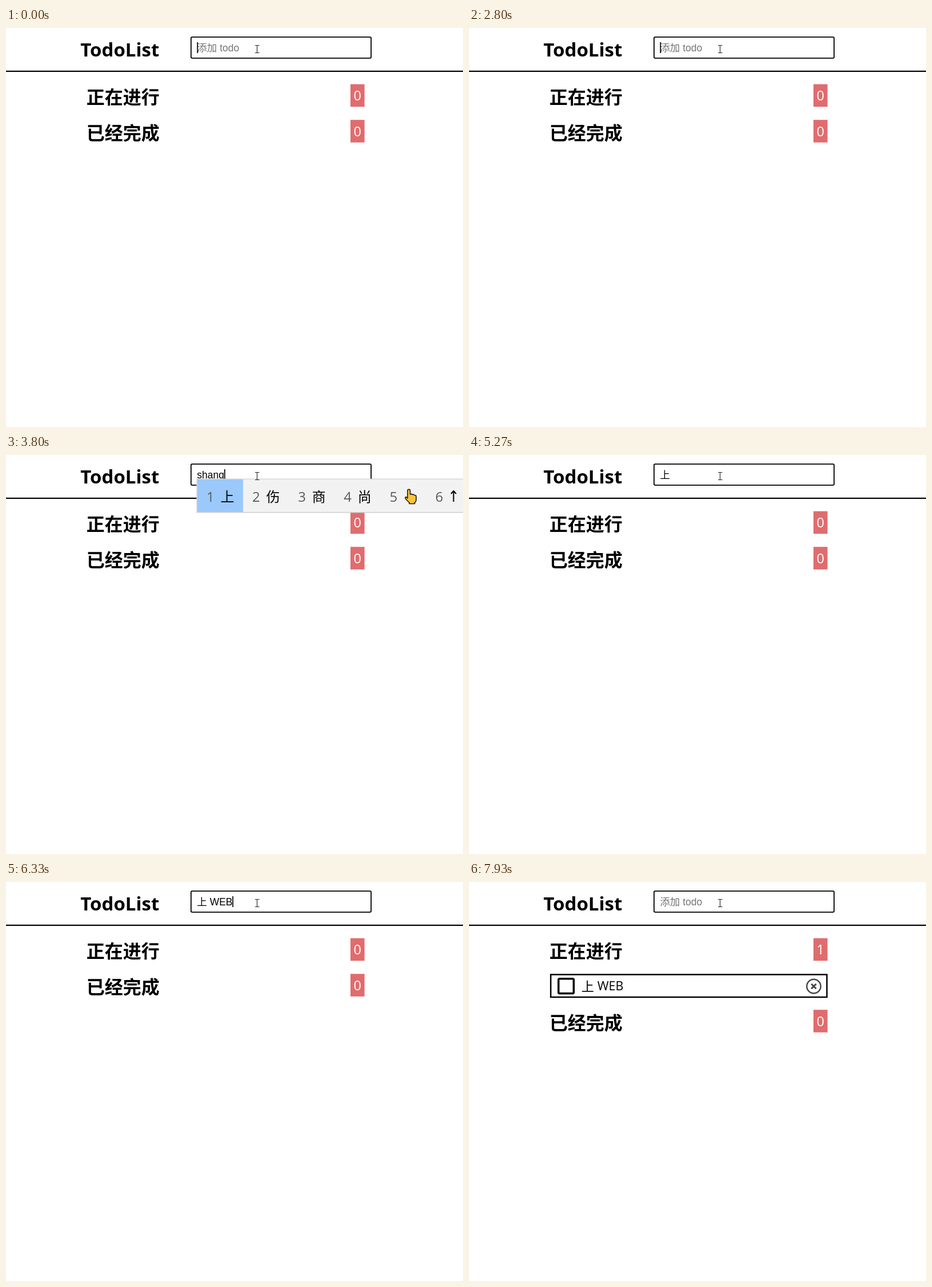
These frames come from a looping animation (800 by 700 pixels, 8000 ms). An HTML page:

```html
<!DOCTYPE html>
<html lang="zh-CN">
<head>
<meta charset="utf-8">
<title>TodoList</title>
<style>
  html, body { margin: 0; width: 100%; height: 100%; overflow: hidden; background: #fff; }
  svg { display: block; width: 800px; height: 700px; }
  text { white-space: pre; font-family: 'Open Sans', 'Noto Sans', 'Noto Sans CJK SC', 'Noto Sans CJK', sans-serif; }
  .title { font-size: 33px; font-weight: 700; }
  .head, .cjk { font-family: 'Noto Sans CJK SC', 'Noto Sans CJK', sans-serif; }
  .head { font-size: 32px; font-weight: 700; }
  .count { font-size: 23.5px; font-weight: 500; fill: #fff; text-anchor: middle; }
  .field { font: 17.5px 'Liberation Sans', 'Noto Sans CJK SC', 'Noto Sans CJK', sans-serif; }
  .num { font-size: 24px; fill: #5c5c5c; }
  .cand { font-size: 24px; }
  .line { fill: none; stroke: #000; }
</style>
</head>
<body>
<svg viewBox="0 0 800 700">
  <text class="title" x="130.3" y="49.5">TodoList</text>
  <rect y="74.8" width="800" height="2.2"/>
  <rect class="line" x="323.9" y="15.9" width="315.2" height="36.9" rx="2" stroke-width="1.8"/>
  <text class="field" id="field" x="334.3" y="41"></text>
  <rect id="caret" y="25" width="1.7" height="19"/>

  <text class="head" x="140.8" y="133">正在进行</text>
  <rect x="603" y="98.6" width="24.6" height="39.6" fill="#e06c6e"/>
  <text class="count" id="open" x="615.2" y="127">0</text>

  <g id="item">
    <rect class="line" x="143.1" y="162.4" width="483.4" height="39.6" stroke-width="2.5"/>
    <rect class="line" x="156.7" y="169.8" width="26.6" height="25.8" rx="2" stroke-width="3.5"/>
    <text class="cjk" x="196.7" y="191" font-size="22">上</text>
    <text x="224.8" y="190" font-size="21.4">WEB</text>
    <g fill="none" stroke="#444">
      <circle cx="603.5" cy="183" r="12.2" stroke-width="2.4"/>
      <path d="M599.3 178.8l8.4 8.4m0-8.4l-8.4 8.4" stroke-width="2.9"/>
    </g>
  </g>

  <g id="done">
    <text class="head" x="140.8" y="195.8">已经完成</text>
    <rect x="603" y="161.2" width="24.6" height="39.6" fill="#e06c6e"/>
    <text class="count" x="615.2" y="189.6">0</text>
  </g>

  <g id="popup"></g>
  <path d="M436 30.5h3l.5.5.5-.5h3.5M439.5 31v12M436 43.5h3l.5-.5.5.5h3.5" fill="none" stroke="#222" stroke-width="1.1"/>
</svg>
<script>
const $ = id => document.getElementById(id);
const LOOP = 8000, HINT = '添加 todo';

// start time, field text, caret x (0 = hidden), candidates
const steps = [
  [0, '', 334.4], [130, '', 0], [670, '', 334.4], [1200, '', 0],
  [1730, '', 334.4], [2270, '', 0], [2800, '', 334.4],
  [3200, 's', 343, '是说上时三四'],
  [3330, 'sh', 352.8, '是上时说谁数'],
  [3470, 'sha', 362.8, '莎啥杀傻沙砂'],
  [3600, 'shan', 372.5, '山善闪删扇衫'],
  [3800, 'shang', 382, '上伤商尚☝↑'],
  [4400, '上', 351.7], [4730, '上 ', 356.5], [5270, '上 ', 0],
  [5400, '上 W', 373, 'W'],
  [5670, '上 WE', 384.8, 'WE'],
  [6000, '上 WEB', 396.3, 'WE'],
  [6070, '上 WEB', 396.3, 'WEB'],
  [6330, '上 WEB', 396.3], [6870, '上 WEB', 0],
  [6930, '', 0], [7400, '', 334.4], [7930, '', 0]
];

const rect = (x, y, w, h, fill) =>
  `<rect x="${x}" y="${y}" width="${w}" height="${h}" fill="${fill}"/>`;
const label = (cls, x, y, s) => `<text class="${cls}" x="${x}" y="${y}">${s}</text>`;

const panel = (x, y, w, h, cell) =>
  rect(x, y, w, h, '#cfcfcf') + rect(x + 1, y + 1.2, w - 2, h - 2.7, '#f2f2f2') +
  rect(x + 1, y + 1.2, cell, 57.3, '#9bc9fb');

const hand = x => `<path transform="translate(${x} 59)" fill="#fbc337" stroke="#1b1b1b"
  stroke-width="1.6" stroke-linejoin="round" d="M5 17V3.5a2.3 2.3 0 0 1 4.6 0V10
  q2-1.5 4 .5q2-1 3.5 1q3-.5 3 2.5v6q0 3-2.5 4.5v2H8v-2L1.5 18q-1.5-3 1-3.5z"/>`;
const arrow = x => `<path class="line" stroke-width="2" d="M${x} 82V63m-4.5 5l4.5-5 4.5 5"/>`;

function glyph(c, x) {
  if (c === '☝') return hand(x + 2);
  if (c === '↑') return arrow(x + 7.5);
  return label('cand cjk', x, 82, c);
}

function pinyin(list, tall) {
  return panel(333.5, 41.5, 480, tall ? 103 : 60, 80.5) +
    [...list].map((c, i) =>
      label('num', 351 + i * 80.1, 81.5, i + 1) + glyph(c, 375.5 + i * 80.1)).join('');
}

function latin(word) {
  const grow = [0, 13, 23][word.length - 1], end = 593 + grow;
  return panel(357, 44.5, end - 357, 60, 80 + grow) +
    label('num', 374, 84.5, 1) + label('cand', 398, 84.5, word) +
    `<g fill="none" stroke="#777" stroke-width="1.5">
      <path d="M${end - 126} 68l-6 7 6 7M${end - 88} 68l6 7-6 7"/>
      <path d="M${end - 58} 46v57" stroke="#d4d4d4"/>
      <circle cx="${end - 29}" cy="75" r="10"/>
      <path d="M${end - 34} 78q5 5 10 0m-8-7v2m6-2v2"/></g>`;
}

function popup(text, list) {
  if (!list) return '';
  return /^[A-Z]/.test(list) ? latin(list) : pinyin(list, text === 'shan');
}

let shown = -1;
function draw(now) {
  const t = now % LOOP;
  let n = steps.length - 1;
  while (steps[n][0] > t) n--;
  if (n === shown) return;
  shown = n;
  const [start, text, caret, list] = steps[n];
  const added = start >= 6930;
  $('field').textContent = text || HINT;
  $('field').setAttribute('fill', text ? '#000' : '#757575');
  $('caret').setAttribute('x', caret);
  $('caret').style.display = caret ? '' : 'none';
  $('popup').innerHTML = popup(text, list);
  $('item').style.display = added ? '' : 'none';
  $('open').textContent = added ? 1 : 0;
  $('done').setAttribute('transform', `translate(0 ${added ? 63 : 0})`);
}

const begin = performance.now();
function tick() {
  draw(performance.now() - begin);
  requestAnimationFrame(tick);
}
tick();
</script>
</body>
</html>
```
